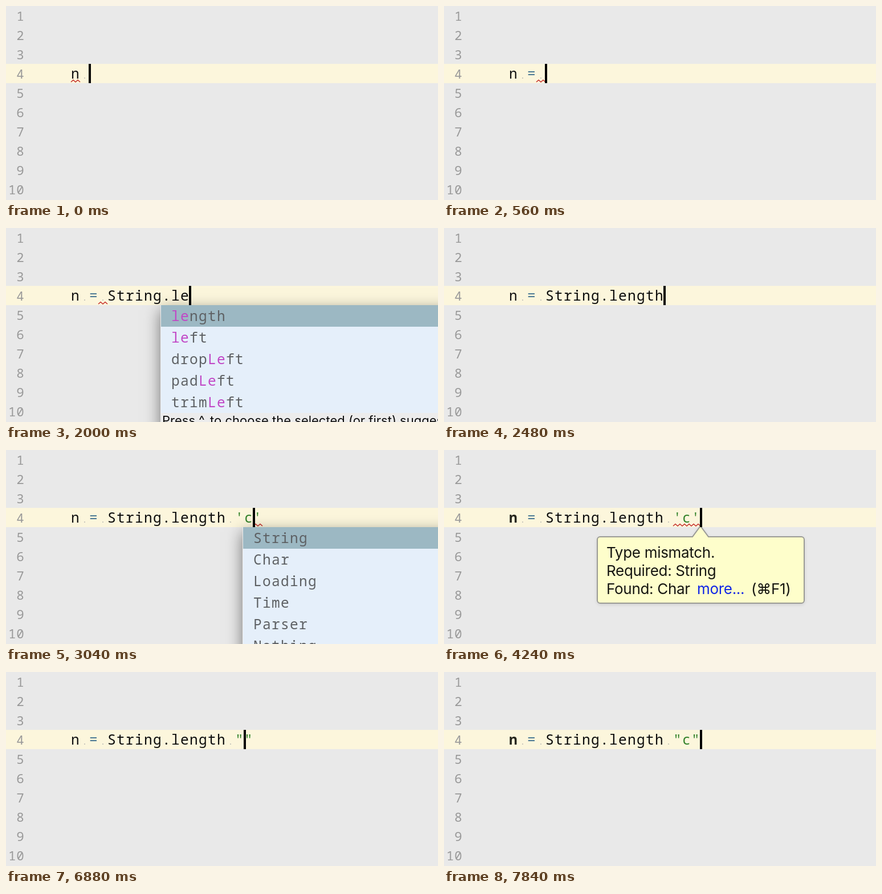
These frames come from a looping animation (758x342 px, 7920 ms). An HTML page with a canvas:

```html
<!DOCTYPE html>
<html lang="en">
<head>
<meta charset="utf-8">
<title>Code editor</title>
<style>
html, body { margin: 0; height: 100%; overflow: hidden; background: #e9e9e9; }
canvas { display: block; }
</style>
</head>
<body>
<canvas id="stage" width="758" height="342"></canvas>
<script>
const ctx = document.getElementById('stage').getContext('2d');
const LOOP = 7920, LEFT = 114, COL = 16, LINE = 34, ROW = 38, BASE = 128;
const MONO = '"Noto Sans Mono", monospace';
const SANS = 'Inter, sans-serif';
const HINT = 'Press ^. to choose the selected (or first) suggestion and insert a dot afterwards';
const MODULES = ['String', 'Char', 'Loading', 'Time', 'Parser', 'Nothing'];
const S_NAMES = ['String', 'Set', 'Parser', 'List', 'Result', 'Basics'];
const METHODS = ['all', 'any', 'append', 'concat', 'cons', 'contains'];
const L_METHODS = ['length', 'left', 'lines', 'dropLeft', 'padLeft', 'trimLeft'];
const LE_METHODS = ['length', 'left', 'dropLeft', 'padLeft', 'trimLeft'];

// Each step: start time, text, squiggle [column, length], popup [column, items], extras
const CALL = 'n = String.length ';
const steps = [
  [0, 'n ', [0, 1]],
  [240, 'n =', [3, 1]],
  [400, 'n = ', [3, 1]],
  [640, 'n = S', [3, 1], [4, S_NAMES]],
  [720, 'n = St', [3, 1], [4, ['String', 'List']]],
  [800, 'n = Str', [3, 1], [4, ['String']]],
  [960, 'n = Stri', [3, 1], [4, ['String']]],
  [1040, 'n = Strin', [3, 1], [4, ['String']]],
  [1200, 'n = String', [3, 1], [4, ['String']]],
  [1360, 'n = String.', [3, 1], [11, METHODS]],
  [1760, 'n = String.l', [3, 1], [11, L_METHODS]],
  [1920, 'n = String.le', [3, 1], [11, LE_METHODS]],
  [2160, 'n = String.len', [3, 1], [11, ['length']]],
  [2320, 'n = String.length'],
  [2560, CALL],
  [2720, CALL + "''", [18, 2], null, { back: 1 }],
  [2960, CALL + "'c'", [20, 1], [20, MODULES], { back: 1 }],
  [3200, CALL + "'c'", [20, 1]],
  [3520, CALL + "'c'", [18, 3], null, { bold: true }],
  [6400, CALL + "'c", [18, 2], null, { bold: true }],
  [6480, CALL + "'", [18, 1]],
  [6640, CALL],
  [6880, CALL + '""', null, null, { back: 1 }],
  [7120, CALL + '"c"', null, null, { back: 1 }],
  [7440, CALL + '"c"'],
  [7760, CALL + '"c"', null, null, { bold: true }]
];

const colX = col => LEFT + COL * col;

function rect(x, y, w, h, color) {
  ctx.fillStyle = color;
  ctx.fillRect(x, y, w, h);
}

function write(text, x, y, color, font, spacing = 0) {
  ctx.font = font;
  ctx.letterSpacing = spacing + 'px';
  ctx.fillStyle = color;
  ctx.fillText(text, x, y);
}

function code(text, x, y, color, weight = 400) {
  write(text, x, y, color, `${weight} 24.5px ${MONO}`, 1.3);
}

function shadow(blur, dy, color) {
  ctx.shadowBlur = blur;
  ctx.shadowOffsetY = dy;
  ctx.shadowColor = color;
}

function drawPage() {
  rect(0, 0, 758, 342, '#e9e9e9');
  rect(0, 3 * LINE, 758, LINE, '#fcf6dc');
  for (let i = 1; i <= 10; i++) {
    write(i, i < 10 ? 18.2 : 4, i * LINE - 8, '#999', `22.5px ${MONO}`, 0.7);
  }
}

function drawCode(text, bold) {
  code('n', LEFT, BASE, bold ? '#26261e' : '#111', bold ? 700 : 400);
  if (text[2]) code('=', colX(2), BASE, '#4d7a94');
  code(text.slice(4, 17), colX(4), BASE, '#0c0c0c');
  code(text.slice(18), colX(18), BASE, '#33822a');
  [...text].forEach((c, i) => {
    if (c === ' ') rect(colX(i) + 7, 126, 2, 2, '#c9c8bd');
  });
}

function drawSquiggle([col, length]) {
  ctx.beginPath();
  for (let i = 0; i <= length * 4; i++) {
    ctx.lineTo(colX(col) + i * 4, i % 2 ? 130.5 : 134);
  }
  ctx.strokeStyle = '#c6302b';
  ctx.lineWidth = 1.6;
  ctx.stroke();
}

function drawPopup([col, items], prefix) {
  const x = colX(col) - 19, top = 136, foot = top + items.length * ROW;
  shadow(26, 9, 'rgba(0,0,0,.5)');
  rect(x, top, 900, foot + 30 - top, '#ececec');
  shadow(0, 0, 'transparent');
  items.forEach((item, i) => {
    const y = top + i * ROW, tx = x + 19;
    rect(x + 1, y, 900, ROW, i ? '#e5effa' : '#9cb8c3');
    code(item, tx, y + 28, '#5e6164');
    const at = prefix ? item.toLowerCase().indexOf(prefix.toLowerCase()) : -1;
    if (at < 0) return;
    const hit = item.slice(at, at + prefix.length), hx = tx + at * COL;
    rect(hx, y, hit.length * COL, ROW, i ? '#e5effa' : '#9cb8c3');
    code(hit, hx, y + 28, '#c148c6');
  });
  write(HINT, x + 3, foot + 21, '#0c0c0c', `22px ${SANS}`);
}

function drawTooltip(alpha) {
  ctx.globalAlpha = alpha;
  ctx.beginPath();
  ctx.moveTo(450, 134);
  ctx.lineTo(464, 153);
  ctx.arcTo(632, 153, 632, 270, 5);
  ctx.arcTo(632, 270, 269, 270, 5);
  ctx.arcTo(269, 270, 269, 153, 5);
  ctx.arcTo(269, 153, 436, 153, 5);
  ctx.lineTo(436, 153);
  ctx.closePath();
  shadow(6, 2, 'rgba(0,0,0,.15)');
  ctx.fillStyle = '#fefecb';
  ctx.fill();
  shadow(0, 0, 'transparent');
  ctx.strokeStyle = '#9b9b96';
  ctx.lineWidth = 2;
  ctx.stroke();
  const say = (text, x, y, color = '#161611') => write(text, x, y, color, `26px ${SANS}`, -0.3);
  say('Type mismatch.', 285, 190);
  say('Required: String', 285, 222);
  say('Found: Char', 285, 254);
  say('more...', 444, 254, '#1026e6');
  say('(⌘F1)', 539, 254);
  ctx.globalAlpha = 1;
}

function draw(t) {
  const [, text, squiggle, popup, { back = 0, bold = false } = {}] = steps.findLast(s => s[0] <= t);
  const caret = text.length - back;
  drawPage();
  drawCode(text, bold);
  if (squiggle) drawSquiggle(squiggle);
  if (popup) drawPopup(popup, text.slice(popup[0], caret));
  const fade = Math.min((t - 3600) / 320, (6160 - t) / 240, 1);
  if (fade > 0) drawTooltip(fade);
  rect(colX(caret) - 1, 3 * LINE, 4, LINE, '#000');
}

const start = performance.now();
function frame() {
  draw((performance.now() - start) % LOOP);
  requestAnimationFrame(frame);
}
frame();
</script>
</body>
</html>
```
